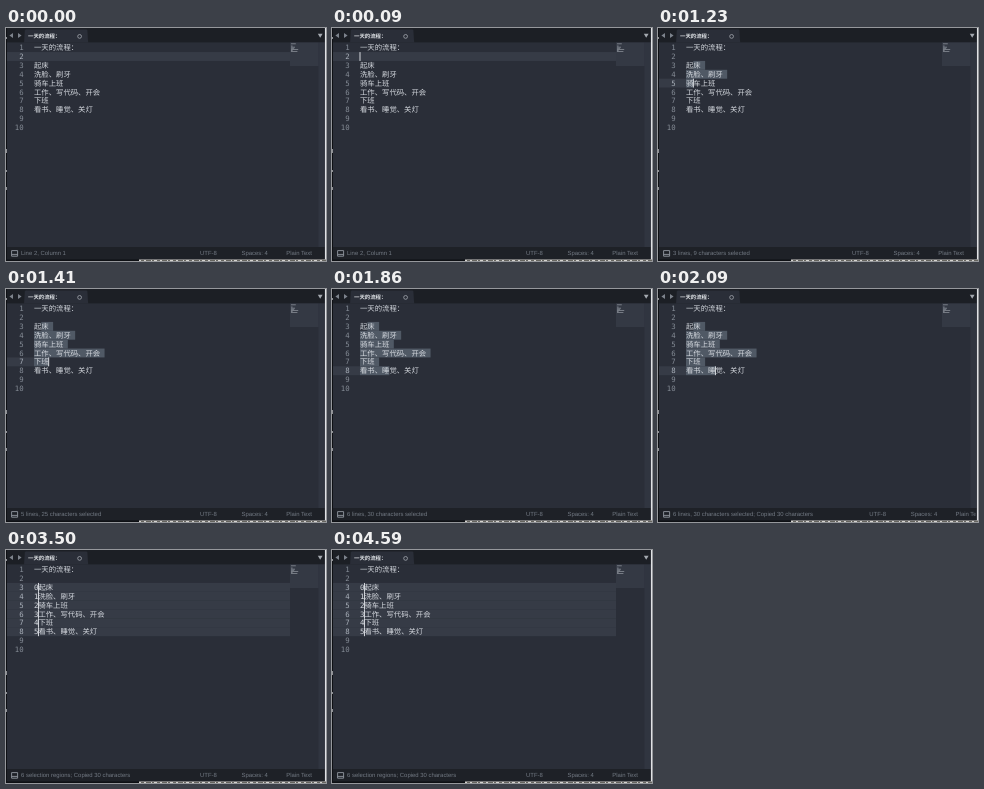
An HTML page for the animation above (4.9 s loop, 320 px wide and 233 px high).

```html
<!DOCTYPE html>
<html lang="zh-CN">
<head>
<meta charset="utf-8">
<title>Editor</title>
<style>
html, body { margin: 0; width: 100%; height: 100%; overflow: hidden; background: #0e1014; }
svg { display: block; width: 100vw; height: 100vh; }
text { white-space: pre; text-rendering: geometricPrecision; }
.code { font: 7.35px "DejaVu Sans Mono", "Noto Sans CJK SC", "Noto Sans CJK", monospace; fill: #d6dae0; }
.num { fill: #858c96; text-anchor: end; }
.num.on { fill: #a9b0ba; }
.ui { font: 5.94px "Liberation Sans", Arial, sans-serif; fill: #737a84; }
.tab { font: bold 5.4px "Noto Sans CJK SC", "Noto Sans CJK", sans-serif; fill: #e4e7eb; }
.row { fill: #363b46; }
.sel { fill: #505965; }
.caret { fill: #e8ebef; }
</style>
</head>
<body>
<svg viewBox="0 0 320 233" preserveAspectRatio="none">
  <rect width="320" height="233" fill="#0e1014"/>
  <path d="M319.3 0V231" stroke="#dfe1e4" stroke-width="1.4"/>
  <path d="M133 232.1H320" stroke="#d5d3cf" stroke-width="1.8"/>
  <path d="M135 232.5H320" stroke="#66655f" stroke-width="1" stroke-dasharray="3 2 5 1 2 3"/>
  <path d="M.4 9v2M.4 121v4M.4 142v2M.4 159v3" stroke="#c4c7cb" stroke-width=".8"/>
  <rect x="1" width="317.6" height="231.2" fill="#2a2e38"/>
  <rect x="1" width="317.6" height="14.4" fill="#1c1f25"/>
  <path d="M18 14.5L18.8 2.4Q19 1.4 20.2 1.4H80Q81.2 1.4 81.4 2.4L82.2 14.5Z" fill="#2a2e38"/>
  <path d="M7 5V10L3.4 7.5ZM12 5V10L15.6 7.5Z" fill="#7d838c"/>
  <path d="M311.8 5.8H316.6L314.2 9.8Z" fill="#a4a9b0"/>
  <circle cx="73.6" cy="8.4" r="1.9" fill="none" stroke="#b0b5bc" stroke-width=".7"/>
  <text class="tab" x="22" y="10">一天的流程：</text>

  <rect x="312.5" y="14.5" width="6" height="204.5" fill="#303540"/>
  <rect x="284" y="14.5" width="28.5" height="23.5" fill="#343944"/>
  <g id="map" fill="#b4b9c1" opacity=".75"></g>
  <g id="marks"></g>
  <g id="lines"></g>
  <g id="carets"></g>

  <rect x="1" y="219" width="317.6" height="12.2" fill="#1e2127"/>
  <path d="M5.6 222.6H11.6V228.2H5.6ZM5.6 226.4H11.6" fill="none" stroke="#9298a1" stroke-width=".9"/>
  <text id="status" class="ui" x="15" y="227.3"></text>
  <svg width="317.6" height="233" style="width:317.6px;height:233px">
    <g id="info" class="ui">
      <text x="194" y="227.3">UTF-8</text>
      <text x="235.5" y="227.3">Spaces: 4</text>
      <text x="280.3" y="227.3">Plain Text</text>
    </g>
  </svg>
</svg>
<script>
const LOOP = 4900, LEFT = 28, CHAR = 7.35, HALF = 4.42, ROW = 8.87, TOP = 15.2;
const text = ["一天的流程：", "", "起床", "洗脸、刷牙", "骑车上班",
  "工作、写代码、开会", "下班", "看书、睡觉、关灯", "", ""];
const anchor = { line: 3, col: 1 };

// start, mode, line, column, caret shown
const steps = [
  [0, "move", 2, 0, 0],
  [90, "move", 2, 0, 1],
  [500, "move", 2, 0, 0],
  [1000, "move", 3, 1, 1],
  [1180, "drag", 4, 1, 1],
  [1230, "drag", 5, 1, 1],
  [1270, "drag", 6, 1, 1],
  [1320, "drag", 7, 1, 1],
  [1410, "drag", 7, 2, 1],
  [1450, "drag", 8, 4, 1],
  [1860, "drag", 8, 4, 0],
  [2050, "copy", 8, 4, 0],
  [2090, "copy", 8, 4, 1],
  [2500, "copy", 8, 4, 0],
  [3090, "copy", 8, 4, 1],
  [3500, "multi", 0, 0, 1],
  [4000, "multi", 0, 0, 0],
  [4590, "multi", 0, 0, 1]
];

const $ = id => document.getElementById(id);
const rowY = n => TOP + (n - 1) * ROW;
const rect = (cls, x, y, w, h) =>
  `<rect class="${cls}" x="${x}" y="${y}" width="${w}" height="${h}"/>`;
const caret = (n, x) => rect("caret", x - .45, rowY(n), .9, ROW);
const rowMark = (n, w) => rect("row", 1, rowY(n), w, ROW);

$("map").innerHTML = text.map((s, i) =>
  rect("", 285, 15.5 + i * 1.1, s.length * .8, .7)).join("");

function drawLines(multi, active) {
  $("lines").innerHTML = text.map((s, i) => {
    const n = i + 1, y = rowY(n) + 7;
    const inRange = multi && n >= 3 && n <= 8;
    const on = inRange || n === active ? " on" : "";
    const digit = inRange ? `<text class="code" x="${LEFT}" y="${y}">${n - 3}</text>` : "";
    const x = LEFT + (inRange ? HALF : 0);
    return `<text class="code num${on}" x="17.6" y="${y}">${n}</text>${digit}` +
      `<text class="code" x="${x}" y="${y}">${s}</text>`;
  }).join("");
}

// Selection boxes from the anchor to the given place, with the character count
function select(line, col) {
  let boxes = "", count = 0;
  for (let n = anchor.line; n <= line; n++) {
    const from = n === anchor.line ? anchor.col : 0;
    const last = n === line;
    const to = last ? col : text[n - 1].length;
    count += to - from + (last ? 0 : 1);
    boxes += rect("sel", LEFT + from * CHAR, rowY(n), (to - from) * CHAR + (last ? 0 : HALF), ROW);
  }
  return { boxes, count };
}

function show([, mode, line, col, on]) {
  const multi = mode === "multi";
  let marks = "", carets = "", label;
  if (multi) {
    for (let n = 3; n <= 8; n++) {
      marks += rowMark(n, 283);
      carets += caret(n, LEFT + HALF);
    }
    label = "6 selection regions; Copied 30 characters";
  } else {
    carets = caret(line, LEFT + col * CHAR);
    if (mode === "move") {
      marks = rowMark(line, 283);
      label = `Line ${line}, Column ${col + 1}`;
    } else {
      const { boxes, count } = select(line, col);
      marks = rowMark(line, 27) + boxes;
      label = `${line - anchor.line + 1} lines, ${count} characters selected`;
      if (mode === "copy") label += `; Copied ${count} characters`;
    }
  }
  $("marks").innerHTML = marks;
  $("carets").innerHTML = on ? carets : "";
  $("status").textContent = label;
  $("info").setAttribute("transform", `translate(${mode === "copy" ? 17.3 : 0} 0)`);
  drawLines(multi, line);
}

let current;
const began = performance.now();
function tick() {
  const t = (performance.now() - began) % LOOP;
  const step = steps.findLast(s => s[0] <= t) || steps[0];
  if (step !== current) show(current = step);
  requestAnimationFrame(tick);
}
tick();
</script>
</body>
</html>
```
